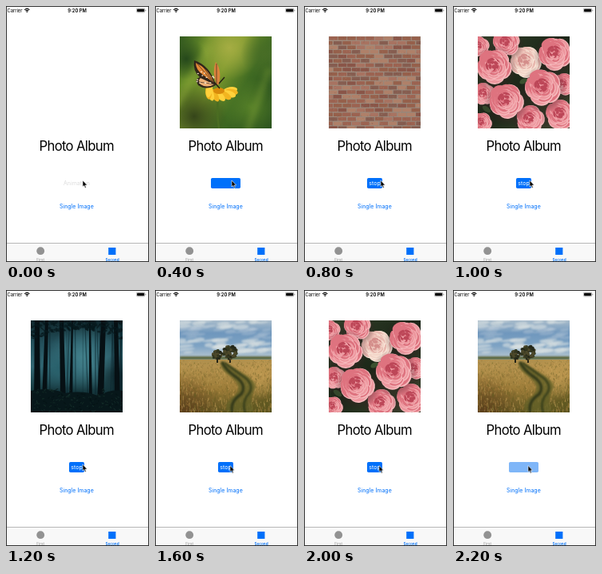
Write an HTML page with a canvas that moves like this. It is 179 px wide and 320 px high and loops after 2.4 s.

```html
<!DOCTYPE html>
<html lang="en">
<head>
<meta charset="utf-8">
<title>Photo Album</title>
<style>
html, body { margin: 0; width: 100%; height: 100%; overflow: hidden; background: #fff; }
svg, canvas { position: absolute; left: 0; top: 0; display: block; }
canvas { left: 31px; top: 38px; }
text { font-family: Inter, Roboto, sans-serif; }
.mid { text-anchor: middle; }
.label { font-size: 7px; }
.blue { fill: #0070fa; }
.gray { fill: #929292; }

canvas, .state { visibility: hidden; }
canvas, .state, #cursor { animation: 2.4s step-end infinite; }
#butterfly { animation-name: butterfly; }
#field { animation-name: field; }
#brick { animation-name: brick; }
#roses { animation-name: roses; }
#forest { animation-name: forest; }
#idle { animation-name: idle; }
#wide { animation-name: wide; }
#stop { animation-name: stop; }
#fading { animation-name: fading; }
#cursor { animation-name: cursor; }

@keyframes butterfly { 16.66%, 58.33% { visibility: visible } 0%, 25%, 66.66%, 100% { visibility: hidden } }
@keyframes field { 25%, 66.66%, 91.66%, 100% { visibility: visible } 0%, 33.33%, 75% { visibility: hidden } }
@keyframes brick { 33.33%, 75% { visibility: visible } 0%, 41.66%, 83.33%, 100% { visibility: hidden } }
@keyframes roses { 41.66%, 83.33% { visibility: visible } 0%, 50%, 91.66%, 100% { visibility: hidden } }
@keyframes forest { 50% { visibility: visible } 0%, 58.33%, 100% { visibility: hidden } }
@keyframes idle { 0% { visibility: visible } 16.66%, 100% { visibility: hidden } }
@keyframes wide { 16.66% { visibility: visible } 0%, 25%, 100% { visibility: hidden } }
@keyframes stop { 25% { visibility: visible } 0%, 91.66%, 100% { visibility: hidden } }
@keyframes fading { 91.66%, 100% { visibility: visible } 0% { visibility: hidden } }
@keyframes cursor {
  0% { transform: translate(96px, 218px) }
  66.66%, 100% { transform: translate(94px, 219.5px) }
}
</style>
</head>
<body>
<svg width="179" height="320" viewBox="0 0 179 320">
  <rect width="179" height="320" fill="#fff"/>

  <!-- status bar -->
  <text x="1.4" y="7.6" font-size="5.8">Carrier</text>
  <path d="M23.2 4.8Q26.3 2 29.4 4.8M24.5 6.2Q26.3 4.6 28.1 6.2" fill="none" stroke="#000" stroke-width="1.1"/>
  <path d="M25.2 7L26.3 8.2L27.4 7Q26.3 6.2 25.2 7Z"/>
  <text class="mid" x="89" y="7.6" font-size="5.8" font-weight="600">9:20 PM</text>
  <rect x="163.4" y="3" width="10.4" height="5" rx="1.2" fill="none" stroke="#777" stroke-width=".5"/>
  <rect x="164.1" y="3.7" width="9" height="3.6" rx=".7"/>
  <rect x="174.4" y="4.7" width=".8" height="1.6" rx=".4" fill="#777"/>

  <text class="mid" x="88.2" y="181.2" font-size="16.7" letter-spacing="-.66">Photo Album</text>

  <g id="idle" class="state"><text class="mid label" x="88.5" y="224" fill="#dcdcdc">Animation</text></g>
  <rect id="wide" class="state blue" x="70" y="215" width="37" height="13" rx="1.8"/>
  <g id="stop" class="state">
    <rect class="blue" x="79" y="215" width="19" height="13" rx="1.8"/>
    <text class="mid label" x="88.5" y="223.8" fill="#fff">stop</text>
  </g>
  <rect id="fading" class="state" x="70" y="215" width="37" height="13" rx="1.8" fill="#7fb6f8"/>
  <text class="mid label blue" x="88.4" y="252.5">Single Image</text>

  <!-- tab bar -->
  <rect y="296" width="179" height="24" fill="#f8f8f8"/>
  <rect y="296" width="179" height="1" fill="#b8b8b8"/>
  <circle class="gray" cx="43.2" cy="306.2" r="4.9"/>
  <rect class="blue" x="128.2" y="302" width="9.2" height="9"/>
  <text class="mid gray" x="43.2" y="318.6" font-size="4.7">First</text>
  <text class="mid blue" x="133" y="318.6" font-size="4.7" font-weight="600">Second</text>

  <rect x=".5" y=".5" width="178" height="319" fill="none" stroke="#333"/>
  <path id="cursor" d="M0 0V8L1.8 6.4L3 9.4L4.3 8.8L3.1 6H5.6Z" stroke="#fff" stroke-width=".6"/>
</svg>
<canvas id="butterfly" width="115" height="115"></canvas>
<canvas id="field" width="115" height="115"></canvas>
<canvas id="brick" width="115" height="115"></canvas>
<canvas id="roses" width="115" height="115"></canvas>
<canvas id="forest" width="115" height="115"></canvas>

<script>
const SIZE = 115;
let g, seed;

function rnd(a = 0, b = 1) {
  seed = (seed * 16807) % 2147483647;
  return a + (b - a) * seed / 2147483647;
}

const pick = list => list[Math.floor(rnd(0, list.length))];

function sweep(x, y, ...colors) {
  const grad = g.createLinearGradient(0, 0, x, y);
  colors.forEach((c, i) => grad.addColorStop(i / (colors.length - 1), c));
  g.fillStyle = grad;
  g.fillRect(0, 0, SIZE, SIZE);
}

function glow(x, y, r, color) {
  const grad = g.createRadialGradient(x, y, 0, x, y, r);
  grad.addColorStop(0, color);
  grad.addColorStop(1, color + '00');
  g.fillStyle = grad;
  g.fillRect(0, 0, SIZE, SIZE);
}

function oval(x, y, rx, ry, color, turn = 0) {
  g.fillStyle = color;
  g.beginPath();
  g.ellipse(x, y, rx, ry, turn, 0, 7);
  g.fill();
}

function shape(d, color) {
  g.fillStyle = color;
  g.fill(new Path2D(d));
}

function line(d, color, width) {
  g.strokeStyle = color;
  g.lineWidth = width;
  g.stroke(new Path2D(d));
}

function soften(px, draw) {
  g.filter = `blur(${px}px)`;
  draw();
  g.filter = 'none';
}

// Petals run from wide, light outer ones to small, deep inner ones.
function rose(x, y, r, [edge, light, mid, deep]) {
  for (let ring = 1; ring > .2; ring -= .16) {
    const start = rnd(0, 6);
    for (let i = 0; i < 5; i++) {
      const a = start + i * 1.26, d = r * ring * .55;
      const px = x + d * Math.cos(a), py = y + d * Math.sin(a);
      const rx = r * ring * .55, ry = r * ring * .45;
      oval(px, py, rx, ry, edge, a + 1.57);
      oval(px - d * .06, py - d * .06, rx * .95, ry * .9, pick([light, mid]), a + 1.57);
      oval(px - d * .3, py - d * .3, rx * .75, ry * .6, ring > .6 ? mid : deep, a + 1.57);
    }
  }
  oval(x, y, r * .16, r * .12, deep);
}

const paint = {
  butterfly() {
    sweep(115, 70, '#31581f', '#688d29', '#7b982c', '#3f6a22', '#2c541e');
    glow(62, 14, 40, '#a5ad43');
    glow(8, 28, 26, '#25481b');
    glow(18, 100, 42, '#35451a');
    glow(106, 22, 30, '#486d26');
    glow(88, 88, 36, '#557f28');
    soften(3, () => {
      line('M-5 88L38 12', '#91aa3c66', 9);
      line('M84 120L112 40', '#84a33955', 8);
    });
    line('M48 76Q46 96 49 115', '#4b6d22', 2.4);
    for (let i = 0; i < 9; i++) {
      const a = -.35 + i * .48;
      oval(50 + 14 * Math.cos(a), 69 + 5 * Math.sin(a), 9, 4, i % 2 ? '#f2b520' : '#ffd13b', a * .5);
    }
    oval(49, 68, 7, 4, '#d98b0b');
    shape('M45 61Q38 36 18 30Q16 43 25 51Q18 53 23 61Q33 68 45 61Z', '#30251a');
    shape('M43 58Q36 40 20 33Q20 42 29 48Z', '#e68a38');
    shape('M43 60L26 52Q22 55 26 60Q34 65 43 60Z', '#efb176');
    shape('M46 60Q40 44 45 32Q53 42 49 60Z', '#dc833d');
    line('M44 60L20 32M44 60L29 37M44 60L24 57M46 60L46 34', '#392a20', .7);
    for (let i = 0; i < 14; i++)
      oval(rnd(21, 43), rnd(43, 60), 1.1, .8, '#f5e6cd');
    line('M43 57L50 65M49 59L56 51', '#241c14', 1.3);
  },

  field() {
    sweep(0, 48, '#a9bccb', '#6f97bd', '#7ea3c4', '#b9c8d1');
    soften(1.2, () => {
      for (let i = 0; i < 70; i++) {
        const y = rnd(0, 40);
        oval(rnd(0, 115), y, rnd(4, 13), rnd(1, 3), y < 9 || y > 24 ? '#dce2e299' : '#c6d3dd55', -.1);
      }
      line('M0 47H115', '#59643b', 4);
    });

    g.save();
    g.beginPath();
    g.rect(0, 49, 115, 66);
    g.clip();
    sweep(0, 115, '#a68b4d', '#a68b4d', '#b3914d', '#9c7c38', '#5c531f');
    glow(4, 115, 50, '#5d3f1c');
    glow(112, 112, 44, '#5a551f');
    glow(98, 70, 30, '#bd9850');
    for (let i = 0; i < 1300; i++) {
      const y = rnd(51, 118), x = rnd(0, 115);
      line(`M${x} ${y}l${rnd(-1, 1)} ${-rnd(1, 2 + (y - 50) / 14)}`, pick(['#d1ad6388', '#755f2b88', '#605d2477', '#bd914c77']), .7);
    }
    soften(1, () => {
      shape('M52 51Q64 57 77 65Q98 76 94 86Q86 99 93 115H60Q54 103 69 94Q80 82 62 69Q48 59 52 51Z', '#646228cc');
      line('M53 52Q57 61 68 69Q85 80 77 92Q62 102 66 115', '#33391a', 3.4);
      line('M56 53Q67 61 78 69Q94 79 87 91Q77 102 82 115', '#383f1b', 2.6);
    });
    g.restore();

    for (const [x, y, r] of [[63, 40, 10], [47, 43, 7]]) {
      line(`M${x} ${y}V53`, '#252417', 2);
      for (let i = 0; i < 70; i++) {
        const a = rnd(0, 6.28), d = r * .85 * Math.sqrt(rnd());
        oval(x + d * Math.cos(a), y + d * Math.sin(a), r * .2, r * .18, pick(['#25281a', '#343820', '#4c482a']));
      }
    }
  },

  brick() {
    sweep(115, 115, '#a18f80', '#94867b');
    const colors = ['#9c6351', '#8a5548', '#a87361', '#af8069', '#865d50', '#96604b'];
    for (let row = 0; row < 21; row++)
      for (let x = row % 2 ? -6 : 0; x < SIZE; x += 11.5) {
        g.fillStyle = pick(colors);
        g.fillRect(x + rnd(0, .5), row * 5.6 + rnd(0, .4), 10.5, 4.5);
      }
    for (let i = 0; i < 650; i++)
      oval(rnd(0, SIZE), rnd(0, SIZE), rnd(.3, 1), .4, pick(['#6c494366', '#c1a18b66', '#ae7a6866']));
  },

  roses() {
    sweep(115, 115, '#33402a', '#1b2718', '#414b32');
    const pink = ['#f6b9bc', '#ed989f', '#de737f', '#bd4758'];
    const pale = ['#fbe9dc', '#f3d5c8', '#e9b9b0', '#d48e8b'];
    const flowers = [
      [36, 8, 17], [2, 13, 13], [8, 72, 14], [108, 60, 14], [5, 108, 13],
      [66, 104, 18], [104, 98, 19], [97, 22, 21], [21, 38, 22], [36, 81, 22], [82, 64, 23]
    ];
    soften(.6, () => {
      rose(60, 32, 20, pale);
      for (const [x, y, r] of flowers) {
        glow(x, y + 2, r * 1.3, '#3d2025');
        rose(x, y, r, pink);
      }
      oval(11, 91, 6, 3, '#34472b', .6);
      oval(57, 56, 5, 3, '#3c5130', -.5);
    });
  },

  forest() {
    sweep(0, 115, '#10272c', '#24515c', '#326773', '#173a40', '#07171a');
    glow(65, 46, 43, '#42808b');
    glow(35, 60, 27, '#28606b');
    glow(110, 70, 28, '#10272c');
    for (let i = 0; i < 24; i++) {
      const x = rnd(0, 115);
      line(`M${x} 0L${x + rnd(-4, 4)} 92`, '#0b272f99', rnd(.5, 1.5));
    }
    for (const [x, w, lean] of [[5, 6, 1], [18, 4, -2], [36, 5, 3], [51, 2, -1], [73, 2, 2], [88, 6, -3], [104, 5, 3]])
      shape(`M${x} 0h${w}L${x + w + lean} 102h${-w - 2}Z`, '#061014');
    for (let i = 0; i < 160; i++) {
      const x = rnd(0, 115);
      oval(x, rnd(0, 9 + Math.abs(x - 60) * .28), rnd(1, 4), rnd(.6, 2), '#07191dbb', rnd(-1, 1));
    }
    shape('M0 88Q23 83 43 91Q65 87 84 94Q102 85 115 88V115H0Z', '#07171a');
    for (let i = 0; i < 170; i++)
      oval(rnd(0, 115), rnd(86, 115), rnd(.5, 2.2), .6, pick(['#18352b88', '#22463b66', '#03101099']), rnd(-1, 1));
  }
};

for (const name in paint) {
  g = document.getElementById(name).getContext('2d');
  seed = 4271;
  paint[name]();
}
</script>
</body>
</html>
```
